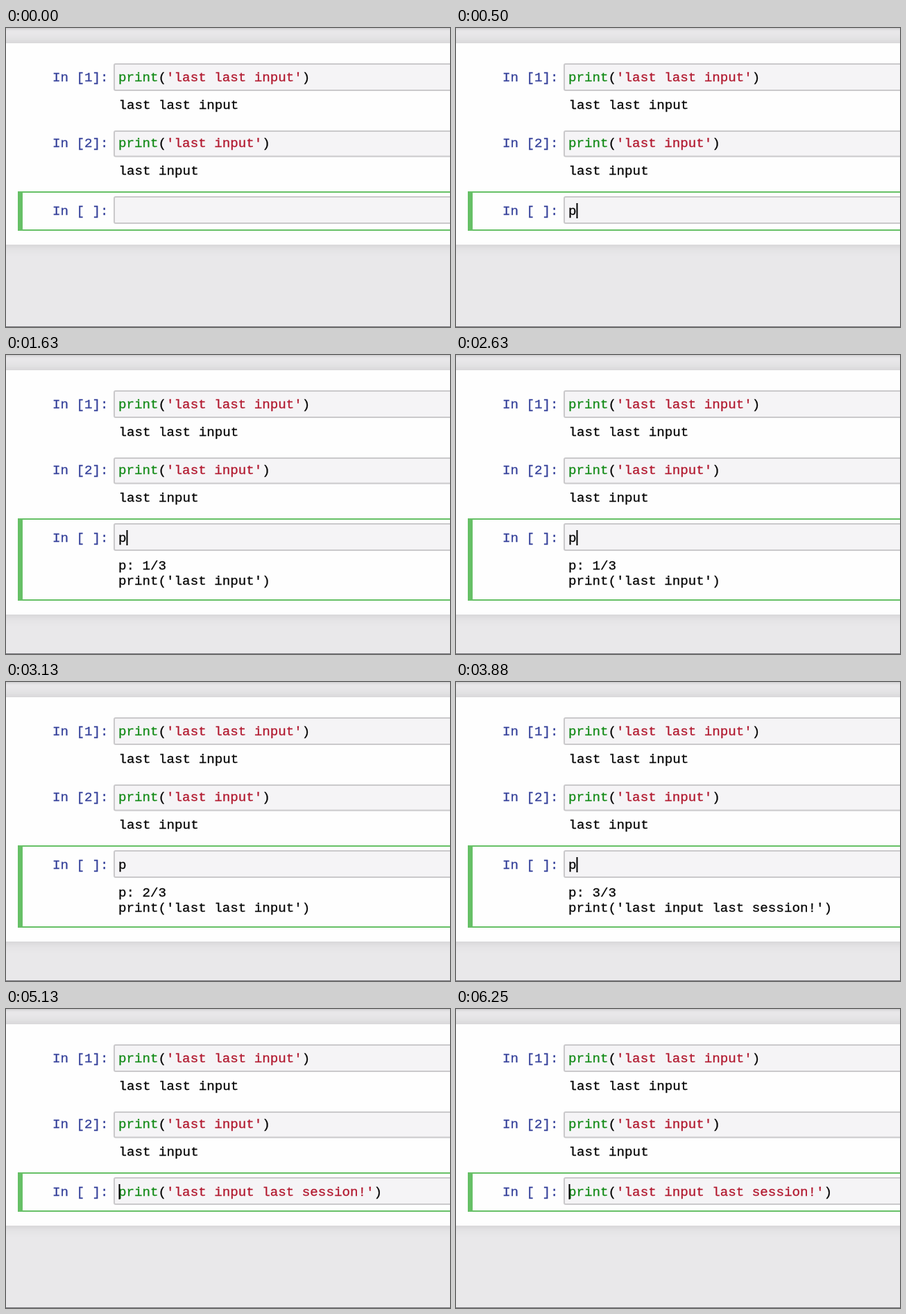
Animation of 640 by 432 pixels, one loop 6370 ms. Source, as an HTML page:

```html
<!DOCTYPE html>
<html lang="en">
<head>
<meta charset="utf-8">
<title>Notebook history</title>
<style>
  html, body { margin: 0; width: 100%; height: 100%; overflow: hidden; background: #e9e8ea; }
  svg { display: block; width: 640px; height: 432px; }
  text { font: 19.2px "Liberation Mono", monospace; fill: #060606; stroke: #060606; stroke-width: .3px; }
  .prompt { fill: #34409a; stroke: #34409a; }
  .call { fill: #128a16; stroke: #128a16; }
  .str { fill: #b2192f; stroke: #b2192f; }
  .field { fill: #f5f4f6; stroke: #cac9cb; stroke-width: 2px; }
  .frame { fill: none; stroke: #66c066; stroke-width: 2px; }
  #page { fill: #fefefe; filter: drop-shadow(0 0 8px rgba(87, 87, 87, .22)); }
  #header { fill: #d0cfd1; filter: drop-shadow(0 0 2px rgba(87, 87, 87, .3)); }
</style>
</head>
<body>
<svg id="stage" viewBox="0 0 640 432">
  <rect width="640" height="432" fill="#e9e8ea"/>
  <rect id="header" x="-20" y="-20" width="680" height="20.5"/>
  <rect id="page" x="-40" y="22" width="720" height="291"/>
  <rect y="431" width="640" height="1" fill="#77767a"/>
  <rect class="frame" id="cell" x="18" y="237" width="660" height="55"/>
  <rect class="bar" id="bar" x="17" y="236" width="7" height="57" fill="#66c066"/>
</svg>
<script>
const DURATION = 6370;
const stage = document.getElementById('stage');

function add(tag, attrs, parent = stage, content = '') {
  const el = document.createElementNS('http://www.w3.org/2000/svg', tag);
  for (const name in attrs) el.setAttribute(name, attrs[name]);
  el.textContent = content;
  return parent.appendChild(el);
}

const label = (x, y, content, cls = '') => add('text', { x, y, class: cls }, stage, content);

function code(y, string) {
  const line = label(162, y, '');
  add('tspan', { class: 'call' }, line, 'print');
  add('tspan', {}, line, '(');
  add('tspan', { class: 'str' }, line, `'${string}'`);
  add('tspan', {}, line, ')');
  return line;
}

function inputCell(top, height, baseline, number) {
  add('rect', { class: 'field', x: 156, y: top + 1, width: 500, height: height - 2, rx: 2 });
  label(67, baseline, `In [${number}]:`, 'prompt');
}

// Hold each value until the next [time, value] entry.
function hold(el, property, table) {
  const frames = table.map(([time, value]) =>
    ({ offset: time / DURATION, [property]: value, easing: 'steps(1, end)' }));
  frames.push({ offset: 1, [property]: table.at(-1)[1] });
  el.animate(frames, { duration: DURATION, iterations: Infinity });
}

const showDuring = (el, from, to = DURATION) =>
  hold(el, 'opacity', [[0, 0], [from, 1], ...(to < DURATION ? [[to, 0]] : [])]);

inputCell(51, 40, 77, 1);
code(77, 'last last input');
label(162.5, 117, 'last last input');

inputCell(148, 38.5, 172, 2);
code(172, 'last input');
label(162.5, 212, 'last input');

inputCell(243, 40, 269.5, ' ');

const TYPED = 500, OPENED = 1630, ACCEPTED = 5130;
const matches = [
  [OPENED, 'last input'],
  [2750, 'last last input'],
  [3880, 'last input last session!']
];
matches.forEach(([start, string], i) => {
  const end = i + 1 < matches.length ? matches[i + 1][0] : ACCEPTED;
  showDuring(label(162, 309.5, `p: ${i + 1}/${matches.length}`), start, end);
  showDuring(label(162, 331.5, `print('${string}')`), start, end);
});

showDuring(label(162, 269.5, 'p'), TYPED, ACCEPTED);
showDuring(code(269.5, matches.at(-1)[1]), ACCEPTED);

for (const [id, height] of [['page', 291], ['cell', 55], ['bar', 57]]) {
  hold(document.getElementById(id), 'height',
    [[0, `${height}px`], [OPENED, `${height + 62}px`], [ACCEPTED, `${height}px`]]);
}

const caret = add('rect', { x: 162.5, y: 253, width: 2, height: 22 });
hold(caret, 'x', [[0, '162.5px'], [TYPED, '173.5px'], [ACCEPTED, '162.5px']]);
const blinks = [0, 130, 1130, 1630, 2130, 2630, 3130, 3750, 4250, 4750, 5750, 6250];
hold(caret, 'opacity', blinks.map((time, i) => [time, i % 2]));
</script>
</body>
</html>
```
